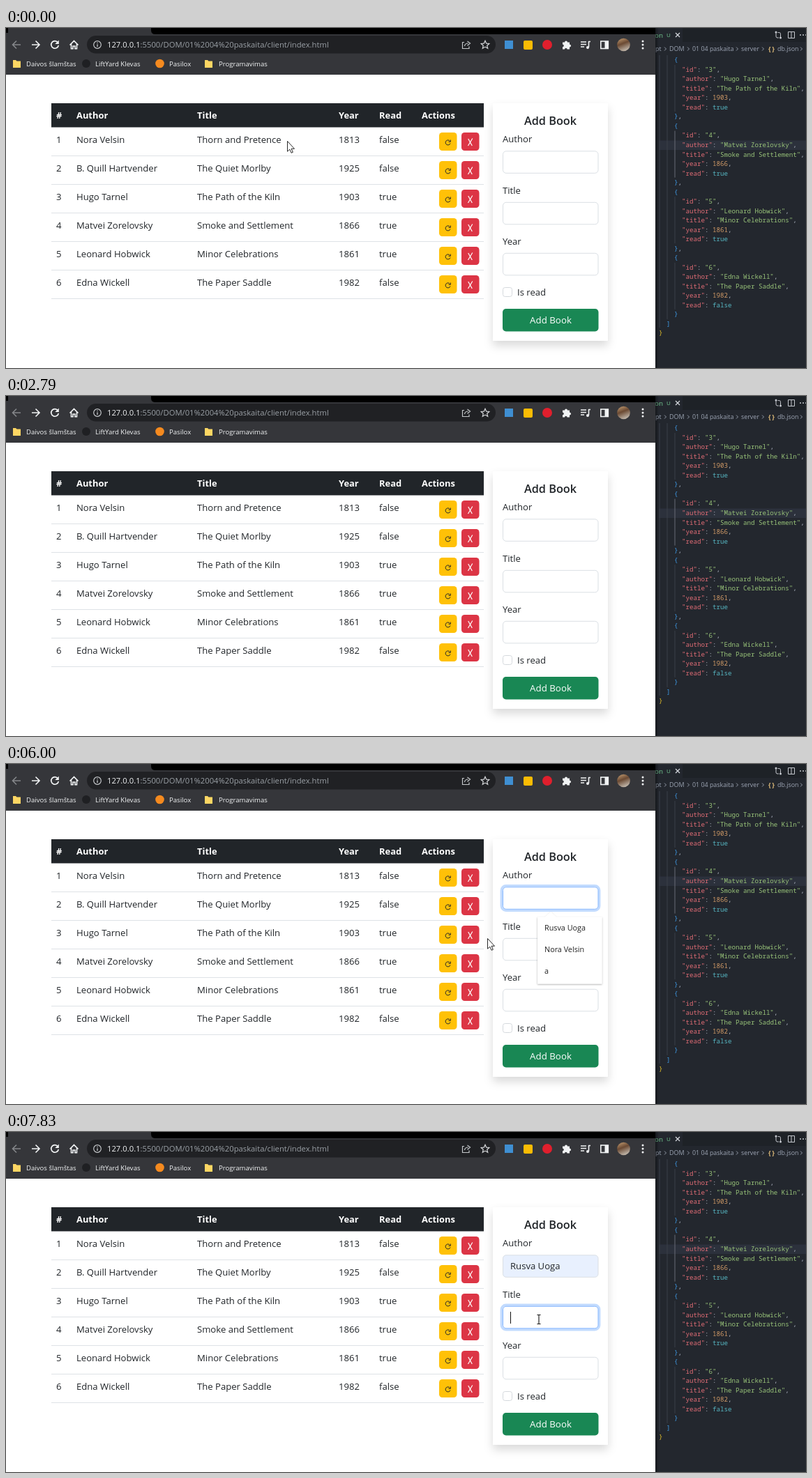
These frames come from a looping animation (1147 px wide and 488 px high, 8 s). An HTML page:

```html
<!DOCTYPE html>
<html lang="en">
<head>
<meta charset="utf-8">
<title>Book list</title>
<style>
html, body { margin: 0; width: 100%; height: 100%; overflow: hidden; background: #fff; }
svg { display: block; width: 1147px; height: 488px; }
text { font-family: "Open Sans", "Noto Sans", sans-serif; white-space: pre; }
.mono { font-family: "Noto Sans Mono", "DejaVu Sans Mono", monospace; }
</style>
</head>
<body>
<svg id="stage" viewBox="0 0 1147 488" xmlns="http://www.w3.org/2000/svg"></svg>
<script>
const LOOP = 8000;
const INK = '#212529';
const FILLED = 'Rusva Uoga';
const books = [
  ['Nora Velsin', 'Thorn and Pretence', 1813, false],
  ['B. Quill Hartvender', 'The Quiet Morlby', 1925, false],
  ['Hugo Tarnel', 'The Path of the Kiln', 1903, true],
  ['Matvei Zorelovsky', 'Smoke and Settlement', 1866, true],
  ['Leonard Hobwick', 'Minor Celebrations', 1861, true],
  ['Edna Wickell', 'The Paper Saddle', 1982, false]
];
const fields = [['Author', 176.5], ['Title', 250], ['Year', 323]];

const rect = (x, y, w, h, fill, more = '') =>
  `<rect x="${x}" y="${y}" width="${w}" height="${h}" fill="${fill}" ${more}/>`;
const circle = (x, y, r, fill, more = '') =>
  `<circle cx="${x}" cy="${y}" r="${r}" fill="${fill}" ${more}/>`;
const text = (x, y, s, size = 13.1, fill = INK, more = '') =>
  `<text x="${x}" y="${y}" font-size="${size}" fill="${fill}" ${more}>${s}</text>`;
const line = (d, color, w = 1, more = '') =>
  `<path d="${d}" fill="none" stroke="${color}" stroke-width="${w}" ${more}/>`;
const group = (id, body) => `<g id="${id}">${body}</g>`;

function browser() {
  const w = '#f1f3f4', url = 11.25;
  const folder = x => `<path d="M${x} 46h4l1.5 1.5h5.500v9.500h-11z" fill="#fdd663"/>`;
  const mark = (x, s) => text(x, 54.5, s, 9.6, w);
  return rect(0, 0, 931, 67, '#35363a') +
    rect(0, 0, 3, 7, '#000') +
    `<path d="M208 0H931V9H214Q208 9 208 3Z" fill="#000"/>` +
    rect(116, 11, 586, 25.5, '#202124', 'rx="12.7"') +
    circle(0, 24, 13, '#5a5b5f', 'id="hover"') +
    line('M21 24H10M15 18.500L9.500 24L15 29.500', '#85878a', 1.6) +
    line('M37 24H48M42.500 18.500L48 24L42.500 29.500', w, 1.6) +
    group('reload', line('M74.300 20.700A5.300 5.300 0 1 0 75.300 24.800', w, 1.7) +
      `<path d="M75.800 17.500V23H70.300Z" fill="${w}"/>`) +
    group('stop', line('M65.500 19.500l9 9m0-9l-9 9', w, 1.7)) +
    line('M91.500 24.500L97.500 18.500L103.500 24.500M93.500 23V29.800H96V26H99V29.800H101.500V23', w, 1.6) +
    circle(131, 24, 5.3, 'none', 'stroke="#c4c7ca" stroke-width="1.2"') +
    line('M131 23.200V27M131 20.800V22', '#c4c7ca', 1.3) +
    text(145, 28, `127.0.0.1<tspan fill="#9aa0a6">:5500/DOM/01%2004%20paskaita/client/index.html</tspan>`, url, w) +
    line('M657 20.500H654.500V29.500H664V26.500M657.500 26Q658 22 662.500 22M661.500 19L665.500 22L661.500 25.200', '#c4c7ca', 1.2) +
    line('M687 18.300l1.700 3.800 4.100.400-3.100 2.700 1 4.100-3.700-2.200-3.700 2.200 1-4.100-3.100-2.700 4.100-.400z', '#d5d7da', 1.2) +
    rect(715, 18, 12, 12, '#3f8fd2') +
    rect(742, 18, 13, 13, '#fbbc04', 'rx="2"') +
    circle(776, 24, 7, '#e01f2d') +
    `<path d="M798 20.500h3a2 2 0 1 1 4 0h3v3a2 2 0 1 1 0 4v3h-3.500a1.700 1.700 0 0 0-3.400 0h-3.100v-3.300a1.800 1.800 0 0 0 0-3.600z" fill="${w}"/>` +
    line('M824 20H832M824 23.500H832M824 27H829M835.500 19V27.500M835 19.500H838', w, 1.6) +
    circle(834, 28, 2, w) +
    rect(852.800, 19, 10.500, 10.500, 'none', `stroke="${w}" stroke-width="1.6"`) + rect(858.500, 19, 5, 10.500, w) +
    circle(885.500, 24, 9.3, 'url(#photo)') +
    [19, 24, 29].map(y => circle(913, y, 1.5, w)).join('') +
    folder(10) + mark(29, 'Daivos šlamštas') +
    circle(115, 51, 6, '#1f2023') + mark(128, 'LiftYard Klevas') +
    circle(220.500, 51, 6.3, '#f58a1f') + mark(234, 'Pasilox') +
    folder(285) + mark(305, 'Programavimas');
}

function table() {
  const cols = [72, 101, 274, 477, 535, 596];
  const head = ['#', 'Author', 'Title', 'Year', 'Read', 'Actions']
    .map((s, i) => text(cols[i], 130, s, 12.9, '#fff', 'font-weight="700"')).join('');
  const rows = books.map((b, i) => {
    const y = 142 + 41 * i;
    return [i + 1, ...b].map((s, c) => text(cols[c], y + 23.3, s)).join('') +
      rect(65, y + 41, 620, 1, '#dee2e6') +
      rect(621, y + 8, 25.500, 26, '#ffc107', 'rx="4.500"') +
      rect(653, y + 8, 25.500, 26, '#dc3545', 'rx="4.500"') +
      line(`M636.600 ${y + 20.500}A3.500 3.500 0 1 0 637 ${y + 23.500}M637.300 ${y + 18.500}V${y + 21.300}H634.500`, INK, 1) +
      line(`M662.700 ${y + 17}L668.300 ${y + 27}M668.800 ${y + 16.500}L662.500 ${y + 27}`, '#fff', 1.2);
  }).join('');
  return rect(65, 108, 620, 34.500, INK) + head + group('rows', rows);
}

function form() {
  const inputs = fields.map(([name, y], i) =>
    text(712, y - 12.3, name) +
    rect(710.300, y - 1.700, 140.400, 35.400, 'none', `id="ring${i}" rx="6.500" stroke="#c2dbfe" stroke-width="3.400"`) +
    rect(712.500, y + .3, 136.500, 31.500, '#fff', `id="box${i}" rx="4.600" stroke="#dadfe4"`)).join('');
  return rect(698, 108, 165, 341, '#fff', 'filter="url(#shadow)"') +
    text(780.500, 138.500, 'Add Book', 16.3, INK, 'text-anchor="middle" font-weight="600"') +
    inputs +
    text(723, 197, FILLED, 13.1, INK, 'id="value"') +
    rect(712.500, 372.500, 13, 13, '#fff', 'rx="3" stroke="#d5d9dd"') +
    text(733, 384, 'Is read') +
    rect(712, 403, 137.500, 32.500, '#198754', 'rx="4.800"') +
    text(781, 424, 'Add Book', 13.3, '#fff', 'text-anchor="middle"') +
    rect(723, 0, 1, 17, '#111', 'id="caret"');
}

function editor() {
  const key = '#e06c75', str = '#98c379', grey = '#9da5b4', brace = '#3f9be8';
  const lines = [];
  const add = (indent, ...parts) => lines.push([indent, parts]);
  const pair = (name, value, color, end = ',') =>
    add(6, [`"${name}"`, key], [': ', '#abb2bf'], [value, color], [end, '#abb2bf']);
  books.slice(2).forEach(([author, title, year, read], i) => {
    add(4, ['{', brace]);
    pair('id', `"${i + 3}"`, str);
    pair('author', `"${author}"`, str);
    pair('title', `"${title}"`, str);
    pair('year', year, '#d19a66');
    pair('read', read, '#56b6c2', '');
    add(4, ['}', brace], [i < 3 ? ',' : '', '#abb2bf']);
  });
  add(2, [']', brace]);
  add(0, ['}', '#e5c02a']);
  const code = lines.map(([indent, parts], i) =>
    text(936 + 5.5 * indent, 49.3 + 13.52 * i,
      parts.map(([s, c]) => `<tspan fill="${c}">${s}</tspan>`).join(''), 9.17, grey, 'class="mono"')).join('');
  const guides = [0, 1, 2, 3].map(i =>
    rect(958.500, 53 + 94.6 * i, 1, 67, i === 1 ? '#686d76' : '#3b4048')).join('');
  const crumbs = [[931, 'pt'], [951, 'DOM'], [984, '01 04 paskaita'], [1054, 'server'], [1106, 'db.json']]
    .map(([x, s]) => text(x, 33.3, s, 8.9, grey)).join('');
  const arrows = [945, 978, 1048, 1085, 1140]
    .map(x => line(`M${x - 1} 27.500l2.500 2.500-2.500 2.500`, grey, .9)).join('');
  return rect(931, 0, 216, 488, '#23272e') + rect(970, 0, 177, 20, '#1e2227') +
    text(930, 13.500, 'on', 9.8, '#73c991') + text(947, 13.300, 'U', 8, '#73c991') +
    line('M960 7l6 6m0-6l-6 6', '#d7dae0', 1.2) +
    line('M1104 6.500v5.500q0 2 2 2h2M1110.500 14v-5.500q0-2-2-2h-2', '#c5c8ce') +
    circle(1104, 6, 1.5, '#c5c8ce') + circle(1110.500, 14, 1.5, '#c5c8ce') +
    line('M1121.500 5.500h9v9h-9zM1126 5.500v9', '#c5c8ce') +
    [1139, 1143, 1147].map(x => circle(x, 10, 1, '#c5c8ce')).join('') +
    crumbs + arrows + text(1092, 33, '{}', 9, '#e5c07b', 'class="mono" font-weight="700"') +
    rect(936, 161.500, 211, 13.500, '#2c313c') +
    rect(936.500, 39, 1, 391, '#3b4048') + rect(947.500, 39, 1, 379, '#3b4048') + guides + code +
    rect(931, 0, 5, 488, 'url(#edge)');
}

function menu() {
  const items = [FILLED, books[0][0], 'a'];
  return `<path d="M762 219.500H773L781 212L789 219.500H854.500V315.500H762Z" fill="#fff" filter="url(#soft)"/>` +
    rect(762, 220, 92.500, 30, '#e8e8e8', 'id="pick"') +
    items.map((s, i) => text(772, 239.300 + 30.700 * i, s, 10.8, '#222')).join('');
}

const stage = document.getElementById('stage');
stage.innerHTML = `<defs>
  <filter id="shadow" x="-20%" y="-10%" width="140%" height="125%"><feDropShadow dx="0" dy="6.8" stdDeviation="6.5" flood-opacity=".15"/></filter>
  <filter id="soft" x="-10%" y="-10%" width="120%" height="125%"><feDropShadow dx="0" dy="1" stdDeviation="1.2" flood-opacity=".35"/></filter>
  <linearGradient id="photo" x2=".4" y2="1"><stop stop-color="#c9a277"/><stop offset=".5" stop-color="#6b4a33"/><stop offset="1" stop-color="#b9ada0"/></linearGradient>
  <linearGradient id="edge"><stop stop-color="#000" stop-opacity=".4"/><stop offset="1" stop-color="#000" stop-opacity="0"/></linearGradient>
  </defs>` + rect(0, 0, 931, 488, '#fff') + editor() + browser() + table() + form() + group('menu', menu()) +
  group('mouse', circle(0, 0, 10.5, '#f5e52e', 'id="click" opacity=".75"') +
    `<path id="arrow" d="M.500 .500V15.200L3.800 12.200L6.100 17.300L8.300 16.300L6.100 11.300H10.500Z" fill="#fff" stroke="#111" stroke-width=".9"/>` +
    group('beam', line('M-2.500 -6.500H-.700L0 -6L.700 -6.500H2.500M0 -6V6M-2.500 6.500H-.700L0 6L.700 6.500H2.500', '#111', 1.1)));

// Pointer stops: time, x, y. A repeated place is a rest.
const path = [
  [0, 403, 162], [70, 403, 162], [400, 160, 90], [700, 28, 8], [810, 20, 18], [880, 20, 18],
  [1100, 70, 38], [1300, 82, 37], [1490, 67, 25], [1830, 67, 25], [1960, 64, 12], [2290, 64, 12],
  [2540, 18, 4], [2790, 40, -24], [2860, 40, -24], [2930, 64, 18], [3190, 664, 157], [3590, 664, 157],
  [3760, 560, 112], [3930, 431, 133], [4080, 140, 205], [4220, 380, 252], [4360, 712, 235],
  [4420, 712, 235], [4700, 535, 190], [4900, 560, 228], [5170, 632, 203], [5240, 632, 203],
  [5380, 762, 194], [5720, 762, 194], [6000, 690, 250], [6200, 690, 250], [6380, 656, 248],
  [6620, 765, 239], [6950, 796, 241], [7090, 796, 241], [7420, 764, 268], [7829, 764, 268],
  [7830, 764, 269], [8000, 764, 269]
];

function slope(i, c) {
  const a = path[i - 1], p = path[i], b = path[i + 1];
  const rest = q => !q || (q[1] === p[1] && q[2] === p[2]);
  return rest(a) || rest(b) ? 0 : (b[c] - a[c]) / (b[0] - a[0]);
}

function pointer(t) {
  const i = Math.max(0, path.findIndex(p => p[0] > t) - 1);
  const p = path[i], q = path[i + 1], d = q[0] - p[0], u = (t - p[0]) / d;
  const s = u * u * (3 - 2 * u);
  return [1, 2].map(c => p[c] + (q[c] - p[c]) * s +
    d * u * (1 - u) * (slope(i, c) * (1 - u) - slope(i + 1, c) * u));
}

const el = id => document.getElementById(id);
const show = (id, on) => el(id).setAttribute('display', on ? 'inline' : 'none');
const set = (id, attrs) => { for (const k in attrs) el(id).setAttribute(k, attrs[k]); };
const ramp = (t, from) => Math.min(1, Math.max(0, (t - from) / 140));

function draw(t) {
  const within = (a, b) => t >= a && t < b;
  const [x, y] = pointer(t);
  const open = within(5590, 7160);
  const preview = within(6600, 7160);
  const filled = t >= 7160;

  const loading = within(1890, 1960);
  show('rows', !loading);
  show('stop', loading);
  show('reload', !loading);

  const button = [42, 70, 97].find(c => Math.hypot(x - c, y - 24) < 13);
  show('hover', button !== undefined);
  if (button) set('hover', { cx: button });

  const focus = [ramp(t, 5450) - ramp(t, 7490), ramp(t, 7490), 0];
  focus.forEach((f, i) => {
    set('ring' + i, { opacity: f });
    set('box' + i, { stroke: f > .5 ? '#86b7fe' : '#dadfe4' });
  });
  set('box0', { fill: preview || filled ? '#e8f0fe' : '#fff' });
  show('value', preview || filled);
  set('value', { 'font-size': filled ? 13.1 : 10.9, fill: filled ? INK : '#000' });
  show('caret', within(5480, 6000) || within(7090, 7490) || t >= 7560);
  set('caret', { y: t < 7500 ? 184.500 : 258 });

  show('menu', open);
  show('pick', preview);

  const typing = !open && x > 712 && x < 849 && fields.some(f => y > f[1] && y < f[1] + 32);
  set('mouse', { transform: `translate(${x.toFixed(1)} ${y.toFixed(1)})` });
  show('arrow', !typing);
  show('beam', typing);
  show('click', within(1830, 1890) || within(5450, 5590) || within(7090, 7160) || within(7490, 7560));
}

const start = performance.now();
function tick() {
  draw((performance.now() - start) % LOOP);
  requestAnimationFrame(tick);
}
draw(0);
requestAnimationFrame(tick);
</script>
</body>
</html>
```
